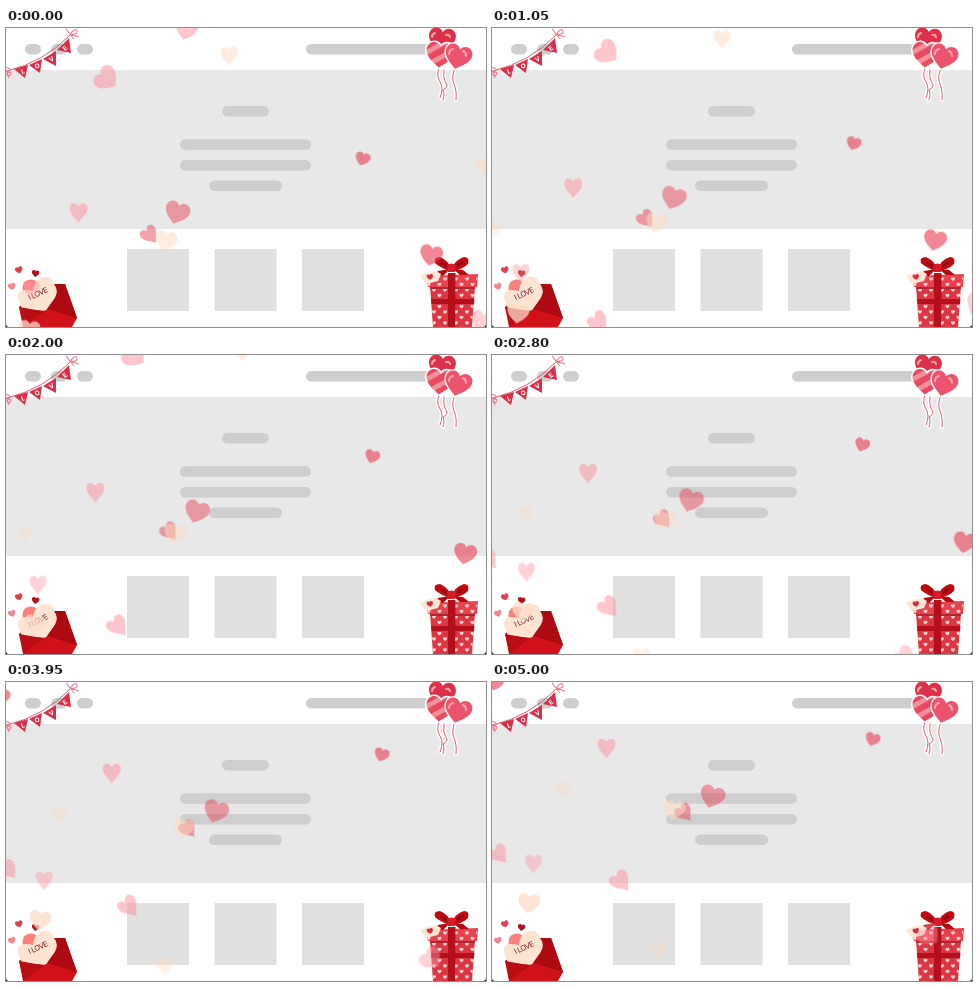
Recreate the animation shown at these times as an HTML page. Size 480 px wide and 299 px high, loop 5.05 s.

```html
<!DOCTYPE html>
<html lang="en">
<head>
<meta charset="utf-8">
<title>Floating hearts</title>
<style>
html, body { margin: 0; width: 100%; height: 100%; overflow: hidden; background: #fff; }
svg { display: block; width: 100%; height: 100%; }
text { font-family: Inter, sans-serif; text-anchor: middle; }
.drift { animation: drift 5.05s steps(101) infinite; }
@keyframes drift {
  from { transform: translate(var(--x0), var(--y0)); }
  to { transform: translate(var(--x1), var(--y1)); }
}
</style>
</head>
<body>
<svg viewBox="0 0 480 299" preserveAspectRatio="none">
  <defs>
    <path id="wide" d="M0 9C-4 6-10 2-10-3C-10-9-3-11 0-6C3-11 10-9 10-3C10 2 4 6 0 9Z"/>
    <path id="tall" d="M0 12C-2 7-10 2-10-4.500C-10-11.500-2-12 0-6C2-12 10-11.500 10-4.500C10 2 2 7 0 12Z"/>
    <pattern id="dots" width="11" height="11" patternUnits="userSpaceOnUse" x="425" y="259">
      <use href="#wide" transform="translate(3 3) scale(.2)" fill="#ffd6d3"/>
      <use href="#wide" transform="translate(8.500 8.500) scale(.2)" fill="#ffd6d3"/>
    </pattern>
    <pattern id="stripes" width="8" height="8" patternUnits="userSpaceOnUse" patternTransform="rotate(-35)">
      <path fill="#e8495e" d="M0 0H8V8H0Z"/>
      <path fill="#f4909b" d="M0 0H8V3.500H0Z"/>
    </pattern>
  </defs>

  <path fill="#fff" d="M0 0H480V299H0Z"/>
  <path fill="#e8e8e8" d="M0 42H480V201H0Z"/>
  <g id="pills" fill="#cecece"></g>
  <path fill="#e0e0e0" d="M121 221h62v62h-62zM208.500 221h62v62h-62zM296 221h62v62h-62z"/>

  <g id="banner">
    <path d="M1 43Q38 34 64 7" fill="none" stroke="#d8344b" stroke-width=".8"/>
    <path fill="#d9304a" d="M8 41L22 37L19 50ZM23 37L36 31L34 45ZM37 31L50 23L50 38ZM51 22L63 10L65 25Z"/>
    <g fill="none" stroke="#e87f90" stroke-width="1.100">
      <path d="M64 6Q59-1 61 2T64 6Q70-1 71 3T64 6L73 9M64 6L68 11"/>
      <path d="M1 44Q-3 38 2 40T1 44Q7 44 4 47T1 44L3 50"/>
    </g>
    <g fill="#fff" font-size="6.500" font-weight="700">
      <text transform="translate(17.500 45.500) rotate(-14)">L</text>
      <text transform="translate(32 40) rotate(-22)">O</text>
      <text transform="translate(46.500 33) rotate(-30)">V</text>
      <text transform="translate(60.500 22) rotate(-42)">E</text>
    </g>
  </g>

  <g id="balloons">
    <g fill="none" stroke-linecap="round">
      <path id="strings" d="M433 40Q430 48 434 54T434 70M438 42Q437 51 440 55T437 62Q439 66 437 72M449 40Q445 49 448 56T450 72" stroke="#fff" stroke-width="4"/>
      <path d="M433 40Q430 48 434 54T434 70M438 42Q437 51 440 55T437 62Q439 66 437 72M449 40Q445 49 448 56T450 72" stroke="#c9384d" stroke-width=".8"/>
    </g>
    <g stroke="#fff" stroke-width="2" paint-order="stroke" stroke-linejoin="round">
      <use href="#wide" transform="translate(436 12) rotate(6) scale(1.350)" fill="#dc3149"/>
      <use href="#wide" transform="translate(434 27) rotate(6) scale(1.400)" fill="url(#stripes)"/>
      <use href="#wide" transform="translate(452 29) rotate(15) scale(1.350)" fill="#ec536c"/>
    </g>
    <path fill="none" stroke="#f8a5b0" stroke-width="2" stroke-linecap="round" d="M426 9Q426 6 429 5M440 7Q443 6 444 9M443 26Q443 22 447 21M457 23Q460 24 460 28"/>
  </g>

  <g id="envelope">
    <path fill="#a90b12" d="M13 279L42 256L59 256L71 290L20 299Z"/>
    <path fill="#f9807d" d="M17 264Q15 254 22 252Q28 250 32 255L38 264L22 272Z"/>
    <path fill="#fde4d2" d="M12 270Q11 263 18 262Q24 262 27 263Q28 252 36 249Q46 247 48 256Q53 262 49 270L40 283L16 281Z"/>
    <text transform="translate(33 268) rotate(-25)" font-size="7.500" letter-spacing="-.5" fill="#7c1a20">I LOVE</text>
    <path fill="#b90e16" d="M13 279L36 283L20 299H17Z"/>
    <path fill="#d2121b" d="M17 299L38 283Q42 280 46 282L71 290L66 299Z"/>
    <path fill="#ae0a11" d="M71 290L41 281L59 256Z"/>
    <use href="#wide" transform="translate(13 242) rotate(-15) scale(.38)" fill="#e0404d"/>
    <use href="#wide" transform="translate(29.500 245.500) rotate(8) scale(.38)" fill="#b3111b"/>
    <use href="#wide" transform="translate(6 258.500) rotate(-15) scale(.38)" fill="#f08890"/>
  </g>

  <g id="gift">
    <path fill="#dc3543" d="M424 258H469L466 299H427Z"/>
    <path fill="url(#dots)" d="M424 260H469L466 299H427Z"/>
    <path fill="#b5101a" d="M425 271H468.500L468 276H425.500Z"/>
    <path fill="#b32631" d="M424 258H469V261H424Z"/>
    <path fill="#e8424f" d="M420 248L472 246L471 259H422Z"/>
    <path fill="url(#dots)" d="M422 249H471V258H422Z"/>
    <path fill="#b5101a" d="M442 245H449.500L449 299H442Z"/>
    <path fill="#c00a12" d="M445 243Q434 240 429 235Q427 229 434 229Q442 232 446 242ZM445 243Q449 231 458 229Q464 229 462 236Q456 242 445 243Z"/>
    <path fill="#8f0810" d="M443 240Q437 238 434 234Q439 233 443 240ZM449 239Q453 233 458 233Q456 238 449 239Z"/>
    <path fill="#b5080f" d="M444 241L432 243L429 247L437 248ZM447 241L457 242L463 247L454 247Z"/>
    <path fill="#d51c27" d="M441 237Q445 234 450 237L449 244H442Z"/>
    <path fill="#fde5d6" d="M414 248L421 245L430 243L435 246L432 253L420 256Z"/>
    <use href="#wide" transform="translate(424 249) rotate(-12) scale(.32)" fill="#d5303f"/>
  </g>

  <g id="hearts"></g>
  <path d="M0 296Q0 299 3 299H0ZM480 296Q480 299 477 299H480Z"/>
</svg>
<script>
const NS = "http://www.w3.org/2000/svg";
const LOOP = 5.05;

function add(parent, tag, attrs) {
  const node = document.createElementNS(NS, tag);
  for (const key in attrs) node.setAttribute(key, attrs[key]);
  return parent.appendChild(node);
}

const pills = document.getElementById("pills");
function pill(x, y, width) {
  add(pills, "rect", { x, y, width, height: 10.5, rx: 5.25 });
}
[19, 45, 71].forEach(x => pill(x, 16, 16));
pill(300, 16, 135);
pill(216, 78, 47);
pill(174, 111.3, 131);
pill(174, 132, 131);
pill(203, 152.5, 73);

const layer = document.getElementById("hearts");
const tones = {
  red: ["#e63f52", 0.48],
  rose: ["#e8455a", 0.64],
  blush: ["#fc8e99", 0.5],
  pale: ["#fc96a0", 0.43],
  cream: ["#fddcc0", 0.5],
  faint: ["#fdd6bc", 0.32],
  solid: ["#fddcc8", 0.75]
};

// Start point, speed per second, width and tilt.
function heart(shape, tone, x, y, vx, vy, width, tilt) {
  const [fill, opacity] = tones[tone];
  const group = add(layer, "g", { class: "drift", opacity });
  const place = { x0: x, y0: y, x1: x + vx * LOOP, y1: y + vy * LOOP };
  for (const key in place) group.style.setProperty("--" + key, place[key] + "px");
  add(group, "use", { href: "#" + shape, fill, transform: `rotate(${tilt}) scale(${width / 20})` });
}

heart("tall", "red", 144, 207, 9.7, -15.2, 17, -38);
heart("wide", "cream", 160, 213, 4.4, -17, 22, 10);
heart("wide", "red", 171, 185, 9.8, -14, 25, 18);
heart("wide", "rose", 356.5, 131, 4.8, -14.7, 15, 18);
heart("tall", "blush", 72.5, 184.5, 8.4, -23.7, 18, 0);
heart("wide", "blush", 101, 51, 13.8, -25, 25, -52);
heart("wide", "blush", 180, 2, 8, -16, 22, 15);
heart("tall", "cream", 223, 27.5, 6.7, -15.5, 17, 0);
heart("tall", "cream", 478, 138, 10, -15, 16, -10);
heart("tall", "faint", -16, 226, 17.5, -23.8, 15, 5);
heart("tall", "blush", 101, 319.5, 5.6, -24, 20, -40);
heart("wide", "rose", 425, 227.5, 17, -14.2, 23, 12);
heart("tall", "pale", 474, 293, 8.5, -16, 19, 25);
heart("tall", "pale", 25.5, 261.5, 3.2, -16, 17, 0);
heart("wide", "solid", 23, 302.5, 2.8, -16.2, 22, 8);
heart("tall", "faint", 127, 345, 8, -15.4, 17, 0);
heart("tall", "blush", -16, 246.5, 4.7, -14.8, 18, -40);
heart("wide", "pale", 380, 365.5, 11.5, -22.4, 23, -45);
heart("wide", "rose", -32, 66, 7, -13, 17, 10);
</script>
</body>
</html>
```
